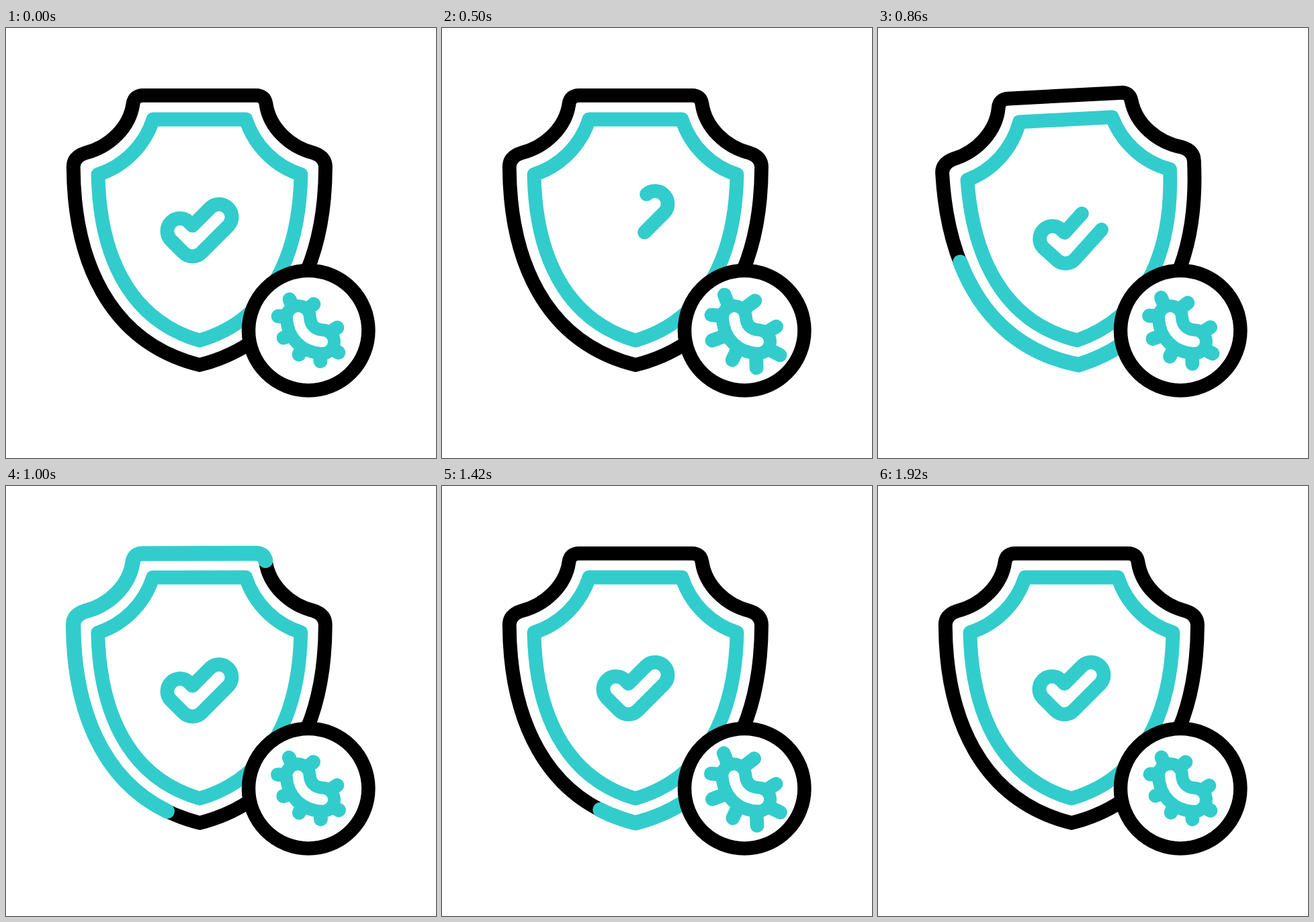
Write an HTML page that moves like this. It is 640 by 640 pixels and loops after 2020 ms.

```html
<!DOCTYPE html>
<html lang="en">
<head>
<meta charset="utf-8">
<title>Protected shield</title>
<style>
  html, body { margin: 0; width: 100%; height: 100%; overflow: hidden; background: #fff; }
  svg { display: block; width: 100vw; height: 100vh; }
  path, line { fill: none; stroke-width: 20.8; stroke-linecap: round; stroke-linejoin: round; }
  .teal { stroke: #33cccc; }
  .black { stroke: #000; }
</style>
</head>
<body>
<svg viewBox="0 0 640 640">
  <defs>
    <path id="rim" d="M288 501.500C151 467 101 343 100.300 207Q100 192 118 186C154 177 184 148 189 113Q191 100.400 204 100.400
      H372Q385 100.400 387 113C392 148 422 177 458 186Q475.500 192 475.500 207C475 343 425 467 288 501.500Z"/>
    <path id="tick" d="M304.600 267A19 19 0 0 1 331.400 293.800L290.900 334.300A19 19 0 0 1 264.100 334.300
      L244.600 314.800A19 19 0 0 1 271.400 288L277.500 294.100L304.600 267"/>
  </defs>
  <g id="shield">
    <use href="#rim" class="black"/>
    <path id="sweep" class="teal" style="stroke-width:22.400"/>
    <path class="teal" d="M219 136H357C370 176 401 206 439 218C437 330 398 433 288 465
      C178 433 139 330 137 218C175 206 206 176 219 136Z"/>
    <path id="tickOut" class="teal"/>
    <path id="tickIn" class="teal"/>
  </g>
  <circle cx="450.200" cy="450.200" r="89.200" fill="#fff" stroke="#000" stroke-width="20.500"/>
  <g id="germ">
    <g id="spikes"></g>
    <path class="teal" style="stroke-width:54" d="M435 431C436 452 450 466 471 467"/>
    <path stroke="#fff" style="stroke-width:16" d="M435 431C436 452 450 466 471 467"/>
  </g>
</svg>
<script>
const LOOP = 2020, STEP = 20, PULSE = 960;
const $ = id => document.getElementById(id);

// root x,y, resting tip x,y, growth dx,dy
const SPIKES = [
  [430, 422, 422, 404, -1.5, -7],
  [447, 420, 458, 411, 8, -5],
  [478, 456, 493, 446, 4.5, -1.5],
  [478, 474, 495, 483, 8, 4],
  [467, 475, 468, 496, 0, 10],
  [445, 468, 436, 486, -4, 8],
  [430, 455, 413, 461, -11, 4],
  [425, 429, 405, 429, -4, -2]
];
const spikes = SPIKES.map(([x1, y1]) => {
  const line = document.createElementNS("http://www.w3.org/2000/svg", "line");
  line.setAttribute("class", "teal");
  line.setAttribute("x1", x1);
  line.setAttribute("y1", y1);
  $("spikes").append(line);
  return line;
});

$("sweep").setAttribute("d", $("rim").getAttribute("d"));
for (const id of ["tickOut", "tickIn"]) $(id).setAttribute("d", $("tick").getAttribute("d"));
const rimLength = $("rim").getTotalLength();
const tickLength = $("tick").getTotalLength();

// Distance along the rim, clockwise from its bottom tip
const HEAD = [[640, -150], [860, 244], [1180, rimLength - 16], [1420, rimLength + 56], [1600, rimLength + 72]];
const TAIL = [[820, -150], [1180, 437], [1420, rimLength - 155], [1600, rimLength + 72]];

// Sine ease from 0 to 1 between two times
function ease(t, from, to) {
  const p = Math.min(1, Math.max(0, (t - from) / (to - from)));
  return (1 - Math.cos(Math.PI * p)) / 2;
}

// Smooth curve through rising keys, without overshoot
function track(keys, t) {
  const last = keys.length - 1;
  if (t <= keys[0][0]) return keys[0][1];
  if (t >= keys[last][0]) return keys[last][1];
  const i = keys.findIndex(k => k[0] > t) - 1;
  const slope = n => (keys[n + 1][1] - keys[n][1]) / (keys[n + 1][0] - keys[n][0]);
  const tangent = n => {
    if (n === 0 || n === last) return 0;
    const a = slope(n - 1), b = slope(n);
    return 2 * a * b / (a + b);
  };
  const [t0, v0] = keys[i], [t1, v1] = keys[i + 1];
  const d = t1 - t0, p = (t - t0) / d, q = 1 - p;
  return v0 * (1 + 2 * p) * q * q + v1 * p * p * (3 - 2 * p)
    + d * p * q * (q * tangent(i) - p * tangent(i + 1));
}

function trim(el, from, to, gap) {
  const len = to - from;
  el.style.visibility = len > 0.5 ? "visible" : "hidden";
  el.style.strokeDasharray = `${len} ${gap}`;
  el.style.strokeDashoffset = -from;
}

function drawShield(t) {
  const tilt = -3 * (ease(t, 540, 630) - ease(t, 870, 1020));
  $("shield").setAttribute("transform", `rotate(${tilt} 288 300)`);

  const head = track(HEAD, t), tail = track(TAIL, t);
  trim($("sweep"), tail, head, rimLength - (head - tail));

  const erased = ease(t, 240, 680), drawn = ease(t, 620, 960);
  trim($("tickOut"), 0, tickLength * (1 - erased), tickLength * 2);
  trim($("tickIn"), tickLength * (1 - drawn), tickLength, tickLength * 2);
  $("tickOut").setAttribute("transform", `translate(0 ${-25 * ease(t, 0, 720)})`);
  $("tickIn").setAttribute("transform", `translate(0 ${20 * (1 - ease(t, 560, 1160))})`);
}

function drawGerm(t) {
  const phase = t % PULSE;
  const turn = -11.5 * (ease(phase, 0, 240) - ease(phase, 240, 520));
  const grow = 0.3 * ease(phase, 0, 200) + 0.7 * ease(phase, 280, 480) - ease(phase, 720, PULSE);
  $("germ").setAttribute("transform", `rotate(${turn} 450 460)`);
  SPIKES.forEach(([, , x, y, dx, dy], i) => {
    spikes[i].setAttribute("x2", x + dx * grow);
    spikes[i].setAttribute("y2", y + dy * grow);
  });
}

function draw(time) {
  const t = Math.min(1920, Math.floor((time % LOOP) / STEP) * STEP);
  drawShield(t);
  drawGerm(t);
}

const start = performance.now();
function tick() {
  draw(performance.now() - start);
  requestAnimationFrame(tick);
}
tick();
</script>
</body>
</html>
```
